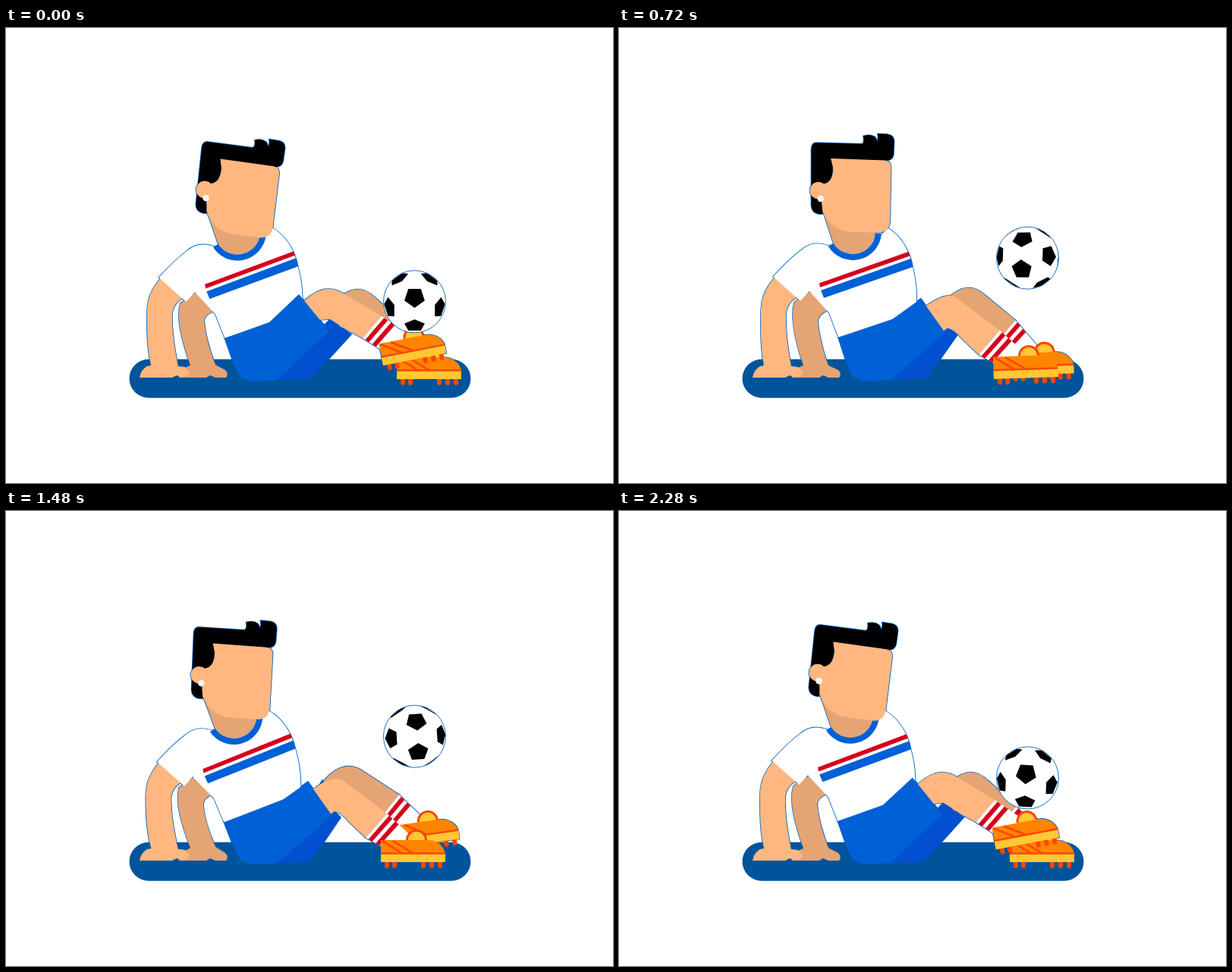
An HTML page with a canvas that plays this animation: 800x600 px, repeating every 2320 ms.

```html
<!DOCTYPE html>
<html lang="en">
<head>
<meta charset="utf-8">
<title>Keepy-uppy</title>
<style>
  html, body { margin: 0; width: 100%; height: 100%; overflow: hidden; background: #fff; }
  canvas { display: block; width: 800px; height: 600px; }
</style>
</head>
<body>
<canvas id="stage" width="800" height="600"></canvas>
<script>
const ctx = document.getElementById('stage').getContext('2d');
const LOOP = 2320, STEP = 40, MAX_LEAN = 9.2;
const SKIN = '#ffb780', SHADE = '#e5a473', MAT = '#00549b', BLUE = '#0060d6', NAVY = '#0050cf';
const RED = '#d6001c', ORANGE = '#ff8400', YELLOW = '#ffc834', FLAME = '#ff4500', EDGE = '#0062c4';

// Smooth, overshoot-free curve through [time, value] pairs; slopes wrap around the loop.
function track(keys) {
  const n = keys.length - 1;
  const slope = i => {
    const a = keys[(i + n) % n], b = keys[(i + n) % n + 1];
    return (b[1] - a[1]) / (b[0] - a[0]);
  };
  const tangent = i => {
    const a = slope(i - 1), b = slope(i);
    return a * b <= 0 ? 0 : 2 * a * b / (a + b);
  };
  return t => {
    let i = 0;
    while (i < n - 1 && t >= keys[i + 1][0]) i++;
    const [t0, a] = keys[i], [t1, b] = keys[i + 1];
    const h = t1 - t0, s = (t - t0) / h, r = 1 - s;
    return a * (1 + 2 * s) * r * r + b * s * s * (3 - 2 * s)
      + h * s * r * (tangent(i) * r - tangent(i + 1) * s);
  };
}

const leanAt = track([[0, -1], [400, 0], [720, 0], [1160, -MAX_LEAN], [1480, -2.5], [1700, -1.2], [2320, -1]]);
const nodAt = track([[0, -0.2], [400, 0], [560, -0.6], [720, -6.1], [1160, -18.3], [1480, -3.9], [1920, 0.6], [2320, -0.2]]);
const frontAt = track([[0, 1], [220, 0.4], [400, 0], [720, 0.012], [1000, 0], [1740, 0], [1920, 0.35], [2280, 0.93], [2320, 1]]);
const rearAt = track([[0, 0], [180, 0.08], [400, 0.58], [600, 1.03], [720, 0.25], [860, 0], [1220, 0], [1480, 1], [1580, 1.05], [1760, 0.3], [1900, 0], [2320, 0]]);
const spinX = track([[0, 0], [400, -3], [720, -8], [1160, 3], [1480, 5], [1920, 12], [2280, -2], [2320, 0]]);
const spinY = track([[0, -6], [400, 14], [720, 16], [1160, -4], [1480, 22], [1920, 1], [2280, -6], [2320, -6]]);
const rollAt = track([[0, 90], [400, 62], [720, 49], [1160, 18], [1480, -18], [1920, -32], [2280, -50], [2320, -54]]);

function ballY(t) {
  if (t < 620) return 323.6 + 4e-4 * (t - 305) ** 2;
  if (t < 1580) return 204.2 + 6.65e-4 * (t - 1106) ** 2;
  return 316.2 + 3e-4 * (t - 1935) ** 2;
}

const rad = d => d * Math.PI / 180;
const lerp = (a, b, k) => a + (b - a) * k;
const lerp2 = (a, b, k) => [lerp(a[0], b[0], k), lerp(a[1], b[1], k)];
const poly = pts => 'M' + pts.map(p => p.join(' ')).join('L') + 'Z';

// Blend two paths that share the same commands.
function morph(a, b, k) {
  const num = /-?\d+(\.\d+)?/g, to = b.match(num);
  let i = 0;
  return a.replace(num, v => lerp(+v, +to[i++], k));
}

let outline = false;

function shape(d, fill) {
  const p = new Path2D(d);
  if (outline) {
    ctx.strokeStyle = EDGE;
    ctx.lineWidth = 1.7;
    ctx.stroke(p);
  } else {
    ctx.fillStyle = fill;
    ctx.fill(p);
  }
}

function detail(d, fill) {
  if (!outline) shape(d, fill);
}

function line(d, color, width) {
  if (outline) return;
  ctx.strokeStyle = color;
  ctx.lineWidth = width;
  ctx.stroke(new Path2D(d));
}

function disc(x, y, r, fill) {
  shape(`M${x - r} ${y}a${r} ${r} 0 1 1 ${2 * r} 0a${r} ${r} 0 1 1 ${-2 * r} 0Z`, fill);
}

function turned(x, y, deg, draw, px = x, py = y) {
  ctx.save();
  ctx.translate(x, y);
  ctx.rotate(rad(deg));
  ctx.translate(-px, -py);
  draw();
  ctx.restore();
}

function shoe() {
  disc(47, -29, 12.5, YELLOW);
  line('M34.5 -29A12.5 12.5 0 0 1 59.5 -29', FLAME, 3);
  [5, 15, 53, 64, 75].forEach(x => detail(`M${x} -1h6v6a3 3 0 0 1 -6 0Z`, FLAME));
  shape('M0 -29H61C75 -29 85 -19 85 -9V0H0Z', ORANGE);
  line('M2 -28L27 -12M16 -28L42 -12', FLAME, 2.6);
  detail('M0 -11H85V0H0Z', YELLOW);
  line('M0 -11.5H84.5', FLAME, 2.4);
}

// Sock from the shin edge (top, low) into the shoe, with two stripes.
function foot(top, low, x, y, deg) {
  const c = Math.cos(rad(deg)), s = Math.sin(rad(deg));
  const place = (a, b) => [x + a * c - b * s, y + a * s + b * c];
  const heel = place(2, -20), instep = place(42, -33);
  shape(poly([top, low, heel, place(30, -20), instep]), '#fff');
  const along = (p, q, d) => lerp2(p, q, d / Math.hypot(q[0] - p[0], q[1] - p[1]));
  [[4, 10], [15, 21]].forEach(([a, b]) => detail(poly([
    along(top, instep, a), along(top, instep, b), along(low, heel, b), along(low, heel, a)
  ]), RED));
  turned(x, y, deg, shoe, 0, 0);
}

function arms(u) {
  shape(morph(
    'M256 345L231 362C225 382 232 412 243 445L238 447Q230 452 228 461L264 461L269 458L276 461L290 461Q294 456 289 451L276 445C268 425 263 400 262 386Q263 378 274 373Z',
    'M245 353L220 372C217 392 228 412 243 442L238 447Q230 452 228 461L264 461L269 458L276 461L290 461Q294 456 289 451L277 438C264 415 255 400 254 387Q255 381 264 377Z', u), SHADE);
  shape(morph(
    'M206 328C190 346 187 360 187 378L187 398Q187 425 191 445L186 446Q178 450 176 461L219 461L225 458L231 461Q243 459 242 454L236 447L227 446Q219 405 220 376Q222 362 234 355Z',
    'M193 338C179 358 177 364 177 380L178 398Q182 420 192 445L186 446Q178 450 176 461L219 461L225 458L231 461Q243 459 242 454L236 447L226 445Q212 402 211 380Q212 371 221 366Z', u), SKIN);
}

function rearLeg(r, p, u) {
  shape(morph(
    'M430 365C450 342 468 338 486 355L524 389L503 413L470 398L440 395Z',
    'M410 368C432 333 455 331 472 344L518 374L498 399L465 390L435 390Z', r), SHADE);
  foot(lerp2([524, 389], [518, 374], r), lerp2([503, 413], [498, 399], r),
    515 - 1.5 * r, 463 - 19 * r, -8 * r);
  const hem = 448 - 7 * r + 7 * p, seat = 412 - 15 * u;
  shape(`M${408 + 9 * r} ${375 - 20 * r}L402 380L425 364Z`, BLUE);
  shape(`M350 464L${432 - 5 * p} ${395 - 11 * p}L${hem} 404L${seat} 453Q${seat - 6} 463 ${seat - 16} 463Z`, NAVY);
}

function frontLeg(p) {
  shape(morph(
    'M395 374C420 354 437 347 449 359L502 399L474 431L452 410Q441 397 433 396L425 402Z',
    'M385 367C408 344 425 338 445 350L495 380L470 409L452 400Q440 392 427 384L414 385Z', p), SKIN);
  foot(lerp2([502, 399], [495, 380], p), lerp2([474, 431], [470, 409], p),
    494 + 3 * p, 463 - 18 * p, -11 * Math.max(p, 0) ** 0.4);
}

function torso(lean, u) {
  ctx.save();
  ctx.translate(-15 * u, 10 * u);
  shape('M276 287C262 282 250 284 240 293Q224 305 203 328L239 360L251 347L280 355L305 305Z', '#fff');
  ctx.restore();
  turned(345, 447, lean, () => {
    shape('M276 287L345 273L355 264C375 277 384 298 387 315C391 332 393 345 392 372L380 380L289 408L277 376L251 347L250 310Z', '#fff');
    detail('M264 336.5L381.5 295L383.5 300.5L265 342Z', RED);
    detail('M266 346L385 304L387.5 315L270 356Z', BLUE);
    shape('M267 236L282.5 284A30 30 0 0 0 338 270V240Z', SHADE);
    line('M279.2 286A34 34 0 0 0 342 271', BLUE, 8);
  });
}

function shorts(lean, p) {
  const c = Math.cos(rad(lean)), s = Math.sin(rad(lean));
  const pin = (x, y) => [345 + (x - 345) * c - (y - 447) * s, 447 + (x - 345) * s + (y - 447) * c];
  const [lx, ly] = pin(289, 408), [rx, ry] = pin(388, 374.5);
  shape(`M${lx} ${ly}L${rx} ${ry}L400 410L357 464.5L322 466Q308 463 302 448Z`, BLUE);
  shape(morph('M345 395L398 357L430 402L357 464.5L330 440Z',
    'M335 399.4L386 351L426 400L357 464.5L330 440Z', p), BLUE);
}

function head(lean, nod) {
  const a = rad(lean), dx = 286 - 345, dy = 238 - 447;
  const x = 345 + dx * Math.cos(a) - dy * Math.sin(a);
  const y = 447 + dx * Math.sin(a) + dy * Math.cos(a);
  turned(x, y, nod, () => {
    shape('M269 149L329 157Q333 156 332 147Q341 145 346 149Q349 151 349 156Q352 153 351 146L364 148Q372 150 371.5 158L369 175Q367 183 358 182L290 173L280 215L268 222L269 243H264Q254 241 254 231L262 157Q263 149 269 149Z', '#000');
    shape('M286 171.5L356 181.5Q364.5 183 364 191L355 263Q352 277 338 275.5L303 271Q278 267 268 241V204Q287 206 287.5 183Z', SKIN);
    detail('M262 200L268 203Q287 204 287.5 183L286 171L270 170Z', '#000');
    disc(265.5, 212, 11.3, SKIN);
    if (!outline) disc(267.3, 223, 4.3, '#f4f4f4');
  }, 286, 238);
}

const dot = (a, b) => a[0] * b[0] + a[1] * b[1] + a[2] * b[2];
const unit = a => a.map(v => v / Math.hypot(...a));
const sum = (a, b, k) => a.map((v, i) => v + b[i] * k);

// Two tangent axes of the sphere at v.
function axes(v) {
  const e = unit(sum([1, 0, 0], v, -v[0]));
  return [e, [v[1] * e[2] - v[2] * e[1], v[2] * e[0] - v[0] * e[2], v[0] * e[1] - v[1] * e[0]]];
}

function ball(t) {
  const R = 41, x = spinX(t) / R, y = spinY(t) / R;
  const c = [x, y, Math.sqrt(1 - x * x - y * y)];
  const [e, f] = axes(c), spots = [c], k = 1 / Math.sqrt(5);
  for (let i = 0; i < 5; i++) {
    const a = rad(rollAt(t) + 72 * i);
    spots.push(unit(sum(sum(c.map(v => v * k), e, 2 * k * Math.cos(a)), f, 2 * k * Math.sin(a))));
  }
  spots.push(...spots.map(v => v.map(n => -n)));

  ctx.save();
  ctx.translate(538.5, ballY(t));
  disc(0, 0, R, '#fff');
  ctx.beginPath();
  ctx.arc(0, 0, R, 0, 7);
  ctx.save();
  ctx.clip();
  for (const v of spots) {
    const [g, h] = axes(v);
    const angle = w => Math.atan2(dot(w, h), dot(w, g));
    const corners = spots.filter(w => dot(v, w) > 0.3 && dot(v, w) < 0.9)
      .sort((p, q) => angle(p) - angle(q))
      .map(w => unit(sum(w, v, 2)));
    if (corners.every(p => p[2] <= 0)) continue;
    // Corners behind the rim are pulled onto it.
    detail(poly(corners.map(p => {
      const m = p[2] < 0 ? R / Math.hypot(p[0], p[1]) : R;
      return [p[0] * m, p[1] * m];
    })), '#000');
  }
  ctx.restore();
  line(`M${-R} 0A${R} ${R} 0 1 1 ${R} 0A${R} ${R} 0 1 1 ${-R} 0`, EDGE, 0.9);
  ctx.restore();
}

function player(t) {
  const lean = leanAt(t), u = -lean / MAX_LEAN, p = frontAt(t);
  arms(u);
  rearLeg(rearAt(t), p, u);
  frontLeg(p);
  torso(lean, u);
  shorts(lean, p);
  head(lean, nodAt(t));
}

function draw(t) {
  ctx.fillStyle = '#fff';
  ctx.fillRect(0, 0, 800, 600);
  outline = true;
  player(t);
  outline = false;
  detail('M188 436.7H587A25.5 25.5 0 0 1 587 487.7H188A25.5 25.5 0 0 1 188 436.7Z', MAT);
  player(t);
  ball(t);
}

function tick() {
  const t = performance.now() % LOOP;
  draw(Math.floor(t / STEP) * STEP);
  requestAnimationFrame(tick);
}
tick();
</script>
</body>
</html>
```
